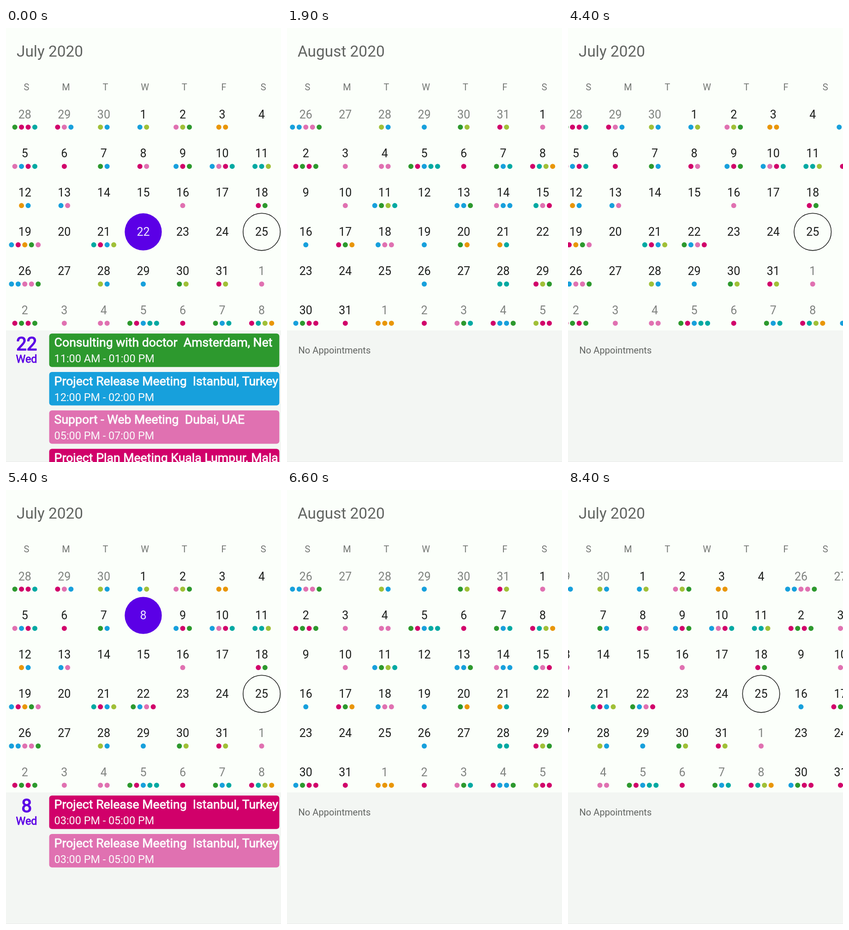
Recreate the animation shown at these times as an HTML page with a canvas. Size 596x940 px, loop 8500 ms.

```html
<!DOCTYPE html>
<html lang="en">
<head>
<meta charset="utf-8">
<title>Month calendar</title>
<style>
html, body { margin: 0; width: 100%; height: 100%; overflow: hidden; background: #fbfffa; }
canvas { display: block; width: 596px; height: 940px; }
</style>
</head>
<body>
<canvas id="stage"></canvas>
<script>
const W = 596, H = 940, LOOP = 8500, STEP = 100;
const PAGE_W = 599.7, COL = 85.55, ROW = 84.95, LEFT = 40.8, TOP = 186.5;
const AGENDA_Y = 655;
const ACCENT = '#5b00e6';
const COLORS = {
  g: '#2d992e', m: '#d1006a', t: '#00a9a2', b: '#17a0dc',
  k: '#e071b1', l: '#a0c037', o: '#e99606'
};

// One entry per day, starting on Sunday 28 June 2020
const EVENTS = `
  gmmt mkb lb bl klg oo -
  kbmt m gb mk bmg bkmt ttl
  ob bk - - k - mg
  bmogk - tmbl gbkm - - -
  bbkkg - lb b gl ml k
  mgmg k kk gmbtt m gbt mtlo
  - k bglt - bbg kbb tkm
  b mgo bkk b go ot -
  - - - b - tt mlg
  bgmm m ooo m kgt mbbg lmm`.trim().split(/\s+/).map(s => s.replace('-', ''));

const JULY = { title: 'July 2020', first: 0, month: 6 };
const AUGUST = { title: 'August 2020', first: 28, month: 7 };
const TODAY = 27;

const RELEASE = 'Project Release Meeting  Istanbul, Turkey';
const SUPPORT = 'Support - Web Meeting  Dubai, UAE';
const CONSULT = 'Consulting with doctor  Amsterdam, Net';
const PLAN = 'Project Plan Meeting Kuala Lumpur, Mala';
const LATE_AM = '11:00 AM - 01:00 PM';
const NOON = '12:00 PM - 02:00 PM';
const AFTERNOON = '03:00 PM - 05:00 PM';
const EVENING = '05:00 PM - 07:00 PM';

// Day index -> appointments
const AGENDA = {
  24: [[CONSULT, LATE_AM], [RELEASE, NOON], [SUPPORT, EVENING], [PLAN, EVENING]],
  52: [['OldPear Board Meeting Paris, France', AFTERNOON]],
  10: [[RELEASE, AFTERNOON], [RELEASE, AFTERNOON]],
  51: [[CONSULT, LATE_AM], [SUPPORT, AFTERNOON], [RELEASE, EVENING]]
};

const TAPS = [[0, 24], [2600, 52], [5400, 10], [7300, 51]];
const SWIPES = [
  { at: 1400, power: 1.19, from: JULY, to: AUGUST },
  { at: 4000, power: 1.8, from: AUGUST, to: JULY },
  { at: 6100, power: 1.3, from: JULY, to: AUGUST },
  { at: 8000, power: 0.83, from: AUGUST, to: JULY }
];

const canvas = document.getElementById('stage');
const ctx = canvas.getContext('2d');
const dpr = window.devicePixelRatio || 1;
canvas.width = W * dpr;
canvas.height = H * dpr;

function text(str, x, y, size, color, align = 'left', bold = 0) {
  ctx.font = `${size}px Roboto, sans-serif`;
  ctx.textAlign = align;
  ctx.fillStyle = color;
  ctx.fillText(str, x, y);
  if (bold) {
    ctx.strokeStyle = color;
    ctx.lineWidth = bold;
    ctx.lineJoin = 'round';
    ctx.strokeText(str, x, y);
  }
}

function disc(x, y, r, color) {
  ctx.beginPath();
  ctx.arc(x, y, r, 0, Math.PI * 2);
  ctx.fillStyle = color;
  ctx.fill();
}

const dateOf = day => new Date(2020, 5, 28 + day);

function drawPage(page, dx, selected) {
  for (let i = 0; i < 42; i++) {
    const day = page.first + i, date = dateOf(day);
    const inMonth = date.getMonth() === page.month;
    const x = LEFT + (i % 7) * COL + dx;
    const y = TOP + Math.floor(i / 7) * ROW;
    const active = inMonth && day === selected;

    if (active) {
      disc(x, y + 0.2, 40.2, ACCENT);
    } else if (inMonth && day === TODAY) {
      ctx.beginPath();
      ctx.arc(x, y + 0.2, 40.3, 0, Math.PI * 2);
      ctx.strokeStyle = '#222422';
      ctx.lineWidth = 1.6;
      ctx.stroke();
    }
    const color = active ? '#f1eaff' : inMonth ? '#1d1f1d' : '#7f827f';
    text(date.getDate(), x, y + 9, 25, color, 'center');

    if (active) continue;
    const dots = EVENTS[day];
    [...dots].forEach((c, n) =>
      disc(x + (n - (dots.length - 1) / 2) * 14.45, y + 28.2, 5.5, COLORS[c]));
  }
}

function drawAgenda(selected) {
  ctx.fillStyle = '#f3f6f3';
  ctx.fillRect(0, AGENDA_Y, W, H - AGENDA_Y);
  ctx.fillStyle = '#e9ebea';
  ctx.fillRect(0, H - 1, W, 1);
  if (selected === null) {
    text('No Appointments', 24.5, 705, 20.1, '#626562');
    return;
  }
  const date = dateOf(selected);
  text(date.getDate(), 44.7, 698, 40, ACCENT, 'center', 1.6);
  text(date.toLocaleDateString('en-US', { weekday: 'short' }), 44.5, 724.7, 23.4, ACCENT, 'center', 0.8);

  AGENDA[selected].forEach(([subject, time], n) => {
    const y = 661.8 + n * 83.2;
    ctx.save();
    ctx.beginPath();
    ctx.roundRect(93.6, y, 498.8, 72.4, 6);
    ctx.fillStyle = COLORS[EVENTS[selected][n]];
    ctx.fill();
    ctx.clip();
    text(subject, 104.6, y + 28.5, 26.65, '#fcfcfc', 'left', 0.8);
    text(time, 104.6, y + 62.5, 23.4, '#fafafa');
    ctx.restore();
  });
}

// Page, neighbour, offset and selected day at a given time
function stateAt(t) {
  const swipe = SWIPES.filter(s => s.at <= t).pop();
  const tap = TAPS.filter(s => s[0] <= t).pop();
  if (!swipe) return { shown: JULY, offset: 0, selected: tap[1] };
  const s = Math.min(1, (t - swipe.at + STEP) / 600);
  const p = 1 - Math.pow(1 - s, swipe.power);
  const turned = p > 0.5;
  return {
    shown: turned ? swipe.to : swipe.from,
    offset: swipe.to === AUGUST ? -p * PAGE_W : (p - 1) * PAGE_W,
    selected: turned && tap[0] < swipe.at ? null : tap[1]
  };
}

function draw(t) {
  const { shown, offset, selected } = stateAt(t);
  ctx.setTransform(dpr, 0, 0, dpr, 0, 0);
  ctx.fillStyle = '#fbfffa';
  ctx.fillRect(0, 0, W, H);
  text(shown.title, 23, 62, 33.4, '#616461');
  [...'SMTWTFS'].forEach((d, i) => text(d, 44.4 + i * COL, 135, 20, '#737673', 'center'));
  drawPage(JULY, offset, selected);
  drawPage(AUGUST, offset + PAGE_W, selected);
  drawAgenda(selected);
}

const start = performance.now();
function frame() {
  const t = (performance.now() - start) % LOOP;
  draw(Math.floor(t / STEP) * STEP);
  requestAnimationFrame(frame);
}
frame();
</script>
</body>
</html>
```
